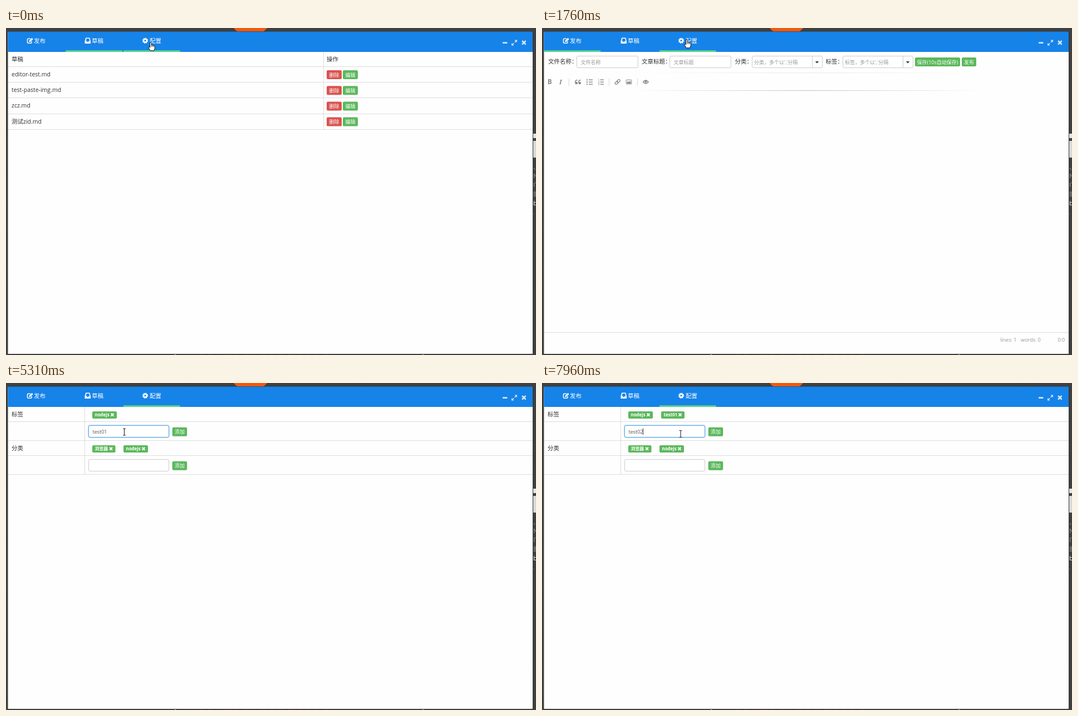
An HTML page that plays this animation: 952 px wide and 588 px high, repeating every 8 s.

```html
<!DOCTYPE html>
<html lang="zh-CN">
<head>
<meta charset="utf-8">
<title>Draft manager</title>
<style>
html, body { margin: 0; width: 100%; height: 100%; overflow: hidden; background: #404040; }
svg { display: block; width: 952px; height: 588px; }
text { font-family: "Open Sans", "Noto Sans CJK SC", "Noto Sans CJK", sans-serif; white-space: pre; }
</style>
</head>
<body>
<svg id="stage" viewBox="0 0 952 588" xmlns="http://www.w3.org/2000/svg"></svg>
<script>
const GREEN = '#5cb85c', RED = '#d9534f', LINE = '#ddd', INK = '#333';

// Markup helpers
const rect = (x, y, w, h, fill, more = '') =>
  `<rect x="${x}" y="${y}" width="${w}" height="${h}" fill="${fill}" ${more}/>`;
const path = (d, more = '') => `<path d="${d}" ${more}/>`;
const text = (x, y, s, size = 10.5, fill = INK, more = '') =>
  `<text x="${x}" y="${y}" font-size="${size}" fill="${fill}" ${more}>${s}</text>`;
const group = (id, body, more = '') => `<g id="${id}" ${more}>${body}</g>`;
const hline = (y, color = LINE) => rect(4, y, 942, 1, color);
const button = (x, y, w, label, fill = GREEN) =>
  rect(x, y, w, 16, fill, 'rx="2.2"') +
  text(x + w / 2, y + 11.6, label, 9, '#fff', 'text-anchor="middle" font-weight="500"');
const input = (x, y, w, hint = '', pad = 7.5) =>
  rect(x + .5, y + .5, w - 1, 21, '#fff', 'rx="2.5" stroke="#ccc"') +
  text(x + pad, y + 14.5, hint, 9, '#999');
const cross = (x, y, r, color, w) =>
  path(`M${x - r} ${y - r}l${2 * r} ${2 * r}m0 ${-2 * r}l${-2 * r} ${2 * r}`,
    `stroke="${color}" stroke-width="${w}" fill="none"`);
const badge = (x, y, w, label) =>
  rect(x, y, w, 13, GREEN, 'rx="2"') +
  text(x + 4.5, y + 9.3, label, 7.9, '#fff', 'font-weight="700"') +
  cross(x + w - 8, y + 6.2, 2.4, '#fff', 2);

function desktop() {
  let s = '<defs><pattern id="weave" width="4" height="4" patternUnits="userSpaceOnUse">' +
    rect(0, 0, 4, 4, '#424242') + rect(0, 0, 2, 1, '#383838') + rect(2, 2, 2, 1, '#383838') +
    '</pattern><linearGradient id="fade"><stop offset="0" stop-color="#bbc" stop-opacity="0"/>' +
    '<stop offset=".5" stop-color="#bcc2c6"/><stop offset="1" stop-color="#bbc" stop-opacity="0"/></linearGradient>' +
    '<filter id="glow" x="-10%" y="-40%" width="120%" height="180%"><feGaussianBlur stdDeviation="1.3"/></filter></defs>';
  s += rect(0, 0, 952, 588, 'url(#weave)');
  s += '<circle cx="439" cy="-24" r="38.4" fill="#f4590c"/>';
  s += rect(946, 190, 6, 8, '#e4e4e4') + rect(946, 203, 6, 30, '#d8d8d8');
  s += [['、', 254], ['N', 270], ['IT', 286], ['的', 303]].map(([c, y]) => text(947, y, c, 11, '#999')).join('');
  s += text(947, 319, 'b', 11, '#eee') + rect(946, 334, 2, 1, '#888');
  for (let i = 0; i < 16; i++) s += rect(331 + i * 16, 586.5, 4 + i * 5 % 7, 1, '#a33a3a');
  s += rect(303, 586, 2, 2, '#ddd9b0') + rect(748, 586, 2, 2, '#ddd9b0');
  return s + rect(3, 6, 944, 581, '#333') + rect(3.5, 7, 942.5, 579, '#fefefe');
}

function header() {
  const pen = 'fill="none" stroke="#fff" stroke-width="1.5"';
  let s = rect(3.5, 6.5, 942.5, 36.5, '#1683e9');
  s += ['发布', '草稿', '配置'].map((t, i) =>
    text(50 + i * 104, 27, t, 10.5, '#fff', 'font-weight="500"') +
    rect(3.5 + i * 103.7, 40, 101.8, 3, '#55d08c', `id="bar${i}"`)).join('');
  s += path('M44 19.2h-4q-1.5 0-1.5 1.5v5q0 1.5 1.5 1.5h4.5q1.5 0 1.5-1.5v-2', pen);
  s += path('M41.5 25v-2.3l5-5 2.2 2.2-5 5z', 'fill="#fff"');
  s += path('M143.3 17.5h7l1.7 6v4.5h-10.5v-4.5zM144.7 19l-1.4 4.6h2l.8 1.6h1.6l.8-1.6h2l-1.4-4.6z',
    'fill="#fff" fill-rule="evenodd"');
  s += '<circle cx="250" cy="22.7" r="2.8" fill="none" stroke="#fff" stroke-width="2.4"/>';
  s += '<circle cx="250" cy="22.7" r="4.4" fill="none" stroke="#fff" stroke-width="1.6" stroke-dasharray="1.8 1.656"/>';
  s += rect(892, 25.3, 8.5, 2.6, '#d4e7fb', 'rx=".8"');
  s += path('M913.5 21.5h4.5v4.5zM908 27v4.5h4.5z', 'fill="#d4e7fb"');
  s += path('M916.8 22.7l-3 3m-1.6 1.6l-3 3', 'stroke="#d4e7fb" stroke-width="1.5"');
  return s + cross(930.3, 26.3, 3.3, '#d4e7fb', 2.5);
}

function drafts() {
  let s = text(10, 60.3, '草稿', 10.5, INK, 'font-weight="500"') +
    text(576, 60.3, '操作', 10.5, INK, 'font-weight="500"') + hline(69);
  ['editor-test.md', 'test-paste-img.md', 'zcz.md', '测试zid.md'].forEach((name, i) => {
    const y = 69 + i * 28.2;
    s += text(10, y + 18, name) + button(576, y + 7, 27, '删除', RED) +
      button(605, y + 7, 27, '编辑') + hline(Math.round(y + 28.2));
  });
  return s + rect(570, 43, 1, 140, LINE);
}

function config() {
  return [69, 103, 130, 164].map(y => hline(y)).join('') + rect(141, 43, 1, 122, LINE) +
    text(10, 60.3, '标签') + text(10, 121.3, '分类') +
    badge(155, 51, 44, 'nodejs') + group('tag', badge(214, 51, 42, 'test01')) +
    badge(155, 112, 41.5, '浏览器') + badge(211, 112, 44, 'nodejs') +
    group('focus', rect(148, 76, 145, 22, '#66afe9', 'rx="3" filter="url(#glow)"')) +
    input(148, 76, 145) +
    rect(148.5, 76.5, 144, 21, '#fff', 'id="ring" rx="2.5" stroke="#5aa9e6"') +
    text(155.5, 90.5, '', 9, '#555', 'id="typed"') + rect(0, 81.5, 1, 11.5, '#333', 'id="caret"') +
    button(298.7, 79.7, 26.5, '添加') +
    group('hot', button(298.7, 79.7, 26.5, '添加', '#449442') +
      rect(298.7, 79.7, 26.5, 16, 'none', 'rx="1.5" stroke="#d98a1c"')) +
    input(148, 137, 145) + button(298.7, 140.7, 26.5, '添加');
}

function editor() {
  const gray = '#87898c', pen = `fill="none" stroke="${gray}" stroke-width="1.3"`;
  const drop = x => rect(x, 51, 1, 20, '#ccc') + path(`M${x + 5.8} 60h6.4l-3.2 3.5z`, `fill="${INK}"`);
  let s = text(11, 64.2, '文件名称：') + input(62, 50, 111, '文件名称') +
    text(179, 64.2, '文章标题：') + input(229, 50, 111, '文章标题') +
    text(346.5, 64.2, '分类：') + input(377, 50, 127, "分类，多个以','分隔", 4) + drop(485) +
    text(509.5, 64.2, '标签：') + input(540, 50, 127, "标签，多个以','分隔", 4) + drop(648) +
    button(670, 53, 81, '保存(10s自动保存)') + button(754, 53, 26, '发布');
  s += rect(160, 80, 635, 1, 'url(#fade)', 'opacity=".35"') + rect(160, 112, 635, 1, 'url(#fade)');
  s += text(10, 101.3, 'B', 11.5, gray, 'font-weight="700"') +
    text(31, 101.3, 'I', 11.5, gray, 'font-weight="700" font-style="italic" style="font-family:\'Noto Serif\',serif"');
  s += [48, 120, 171].map(x => rect(x, 91, 1, 13, '#d9d9d9')).join('');
  for (const x of [59.5, 65.5])
    s += path(`M${x + 4} 93.5q-4 .5-4 4.5`, pen) + rect(x, 97, 4.4, 4, gray, 'rx="1"');
  for (let i = 0; i < 3; i++) {
    const y = 93 + i * 4;
    s += rect(80, y - .7, 2, 2, gray) + rect(84, y - .5, 7, 1.4, gray) +
      rect(104.5, y - .5, 6.5, 1.4, gray) + text(100.5, y + 2, i + 1, 5, gray);
  }
  s += `<g transform="rotate(-45 135.7 97)" ${pen}><rect x="130.2" y="95" width="6" height="4" rx="2"/>` +
    '<rect x="135.2" y="95" width="6" height="4" rx="2"/></g>';
  s += rect(151.2, 93.2, 9.6, 7.6, 'none', `stroke="${gray}" rx=".8"`) +
    path('M152.5 99.7v-2l2-2 1.7 1.5 2-2.2 1.5 2.5v2.2z', `fill="${gray}"`);
  s += path('M181.5 97q4.8-6 9.6 0q-4.8 6-9.6 0z', pen) + `<circle cx="186.3" cy="96.8" r="2" fill="${gray}"/>`;
  return s + hline(547) + text(823, 563.5, 'lines: 1', 9, '#959694') +
    text(860, 563.5, 'words: 0', 9, '#959694') + text(926.5, 563.5, '0:0', 9, '#959694');
}

function cursors() {
  const edge = 'fill="#fff" stroke="#111" stroke-linejoin="round"';
  return group('hand', path('M-1.3 10V1.2Q0-.6 1.3 1.2V6q1.5-1 2.3.3 1.3-.8 2 .4 1.5-.5 1.7 1v3.8L5.8 15.8H-.8' +
      'L-4 10.4Q-4.2 8.6-2.7 9z', edge) + path('M1.3 6v3M3.6 6.5v2.5M5.6 7v2', 'stroke="#111" stroke-width=".8"')) +
    group('beam', path('M-2.5-6H-.5L0-5.5.5-6H2.5M0-5.5V5.5M-2.5 6H-.5L0 5.5.5 6H2.5',
      'fill="none" stroke="#222" stroke-width="1.1"')) +
    group('arrow', path('M0 0v13l3-2.8 2 4.8 2-.9-2-4.6h4.2z', edge));
}

document.getElementById('stage').innerHTML = desktop() + header() +
  group('drafts', drafts()) + group('config', config()) + group('editor', editor()) + cursors();

const $ = id => document.getElementById(id);
const show = (id, on) => $(id).setAttribute('display', on ? 'inline' : 'none');

// Each step changes only the properties it names.
const start = { page: 'drafts', bars: '12', cur: 'hand', at: [260, 25], typed: '', focus: 0, caret: 0, hot: 0, tag: 0 };
const steps = [
  [0, {}],
  [250, { page: 'config', bars: '2' }],
  [530, { at: [226, 24], bars: '2' }],
  [650, { at: [168, 23], bars: '12' }],
  [770, { at: [98, 22], bars: '02' }],
  [890, { at: [64, 22] }],
  [1130, { at: [72, 22] }],
  [1250, { at: [152.5, 22.5] }],
  [1370, { page: 'editor', at: [196, 22], bars: '01' }],
  [1490, { at: [232, 21], bars: '02' }],
  [1610, { at: [255, 20] }],
  [1760, { at: [260, 20] }],
  [1910, { page: 'config', bars: '2' }],
  [2530, { at: [256, 30] }],
  [2650, { cur: 'arrow', at: [240, 58] }],
  [2770, { cur: 'beam', at: [222, 80] }],
  [2890, { at: [213, 87] }],
  [3040, { at: [212.5, 88], focus: .5, caret: 1 }],
  [3190, { focus: 1 }],
  [3340, { typed: 't' }],
  [3460, { typed: 'te' }],
  [3740, { typed: 'tes' }],
  [3890, { typed: 'test' }],
  [4300, { caret: 0 }],
  [4600, { typed: 'test0', caret: 1 }],
  [4880, { typed: 'test01' }],
  [5310, { caret: 0 }],
  [5460, { at: [248, 90] }],
  [5580, { cur: 'hand', at: [307, 89] }],
  [5700, { at: [311, 89], hot: 1 }],
  [5850, { typed: '', focus: 0, tag: 1 }],
  [6010, { cur: 'beam', at: [275, 92] }],
  [6160, { at: [249, 91.5] }],
  [6310, { focus: .5, caret: 1, hot: 0 }],
  [6430, { focus: 1, typed: 't' }],
  [6550, { typed: 'te' }],
  [6820, { typed: 'tes' }],
  [6970, { typed: 'test' }],
  [7370, { caret: 0 }],
  [7680, { typed: 'test0', caret: 1 }],
  [7960, { typed: 'test02' }]
];

function render(t) {
  const s = Object.assign({}, start);
  for (const [from, change] of steps) if (from <= t) Object.assign(s, change);
  for (const p of ['drafts', 'config', 'editor']) show(p, p === s.page);
  for (const i of [0, 1, 2]) show('bar' + i, s.bars.includes(i));
  for (const c of ['hand', 'beam', 'arrow']) show(c, c === s.cur);
  $(s.cur).setAttribute('transform', `translate(${s.at})`);
  for (const id of ['tag', 'hot', 'caret']) show(id, s[id]);
  for (const id of ['focus', 'ring']) $(id).setAttribute('opacity', s.focus);
  const typed = $('typed');
  if (typed.textContent !== s.typed) typed.textContent = s.typed;
  if (s.caret) $('caret').setAttribute('x', Math.round(155.3 + (s.typed ? typed.getComputedTextLength() : 0)));
}

function tick() {
  render(performance.now() % 8000);
  requestAnimationFrame(tick);
}
tick();
</script>
</body>
</html>
```
